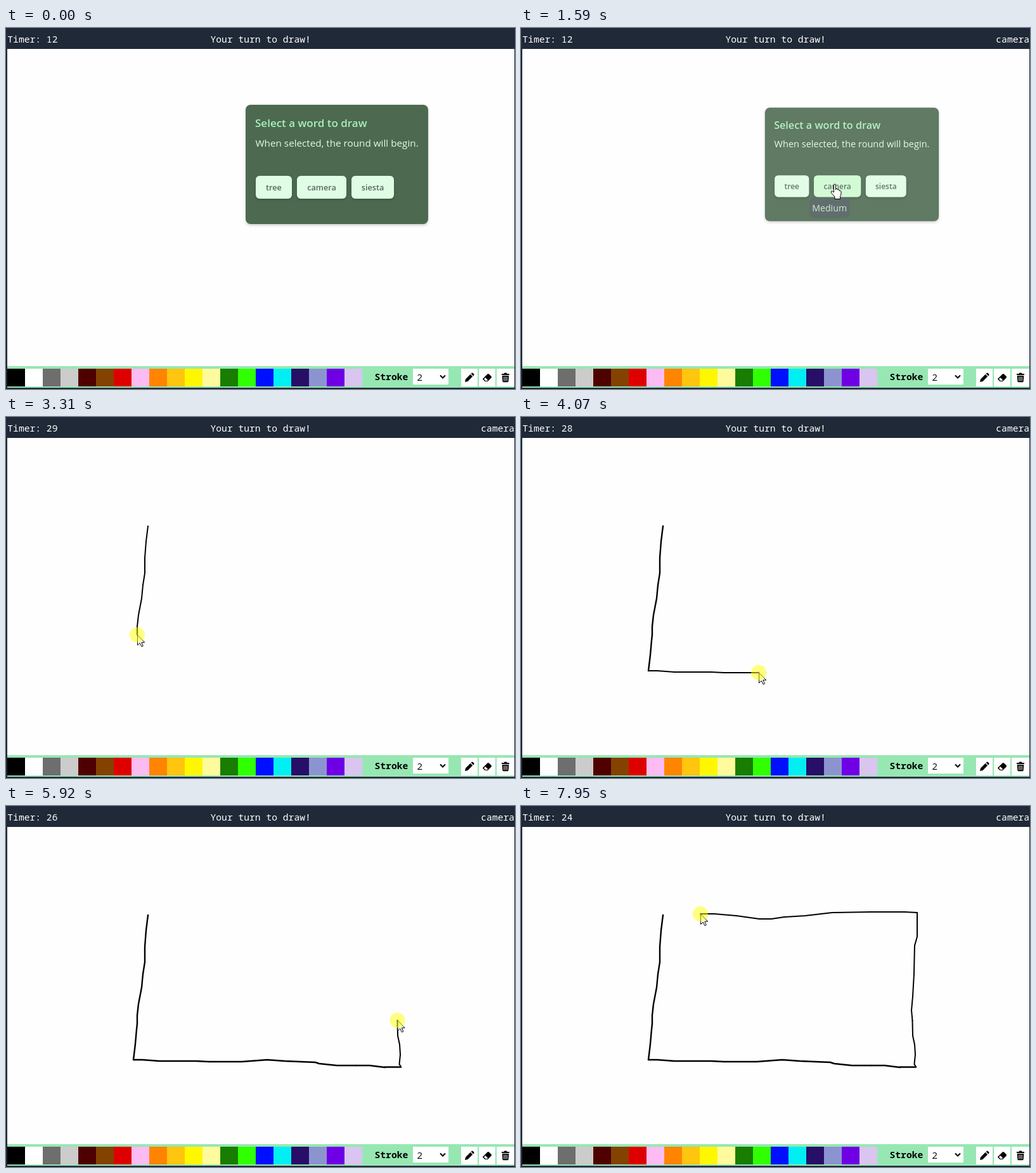
These frames come from a looping animation (803 px wide and 569 px high, 8000 ms). An HTML page:

```html
<!DOCTYPE html>
<html lang="en">
<head>
<meta charset="utf-8">
<title>Drawing game</title>
<style>
  html, body { margin: 0; width: 100%; height: 100%; overflow: hidden; background: #1f2937; }
  svg { display: block; }
  text { white-space: pre; font-family: "Open Sans", "Noto Sans", sans-serif; }
  .mono { font: 14.67px "Noto Sans Mono", "DejaVu Sans Mono", monospace; fill: #fff; }
  .shadow { filter: drop-shadow(0 2px 2px #0003); }
  .button rect { fill: #dffde5; }
  .button text { font-size: 12.7px; font-weight: 600; fill: #56685a; }
  .button.hover rect { fill: #cdfbd0; }
  .pen { fill: none; stroke: #000; stroke-linejoin: round; stroke-linecap: round; }
  .cursor { fill: #fff; stroke: #000; }
</style>
</head>
<body>
<svg width="803" height="569" viewBox="0 0 803 569">
  <rect width="803" height="569" fill="#1f2937"/>
  <rect x="2" y="33" width="800" height="500" fill="#fefefe"/>
  <text class="mono" id="timer" x="2.3" y="23"></text>
  <text class="mono" x="322.5" y="23">Your turn to draw!</text>
  <text class="mono" id="word" x="749.3" y="23">camera</text>

  <rect x="2" y="533" width="800" height="34" fill="#97e7b3"/>
  <g id="palette"></g>
  <text class="mono" x="581.5" y="555" style="font-weight:700;fill:#000">Stroke</text>
  <rect x="642" y="537" width="56" height="25" fill="#fff"/>
  <text x="648.5" y="556" font-size="15">2</text>
  <path d="M685 547.5l4 4 4-4" fill="none" stroke="#000" stroke-width="2"/>
  <path d="M718 537h26v28h-26zM746 537h26v28h-26zM774 537h28v28h-28z" fill="#fff"/>
  <path d="M724 558l1-4.500 7.700-7.700 3.500 3.500-7.700 7.700zM733.700 544.800l1-1q1-.7 2 .2l1.500 1.500q.8 1 0 2l-1 1z"/>
  <path d="M752.500 552.500l7-7q1.200-1 2.400 0l3.600 3.600q1 1.200 0 2.400l-5.500 5.500h-4.500l-3-3q-.8-.8 0-1.500z"/>
  <path d="M754 553.300l2.200-2.200 4 4-1 1h-3z" fill="#fff"/>
  <path d="M782 545h3.500l1-1.500h3l1 1.500h3.500v2h-12zM782.800 548h10.400l-.6 9q-.1 1.200-1.300 1.200h-6.600q-1.200 0-1.300-1.200z"/>
  <path d="M785.700 549.500v7M788 549.500v7M790.300 549.500v7" stroke="#fff" stroke-width=".9"/>

  <g id="dialog">
    <rect class="shadow" x="378" y="121" width="288" height="188" rx="8" fill="#4d6a50"/>
    <text x="393" y="156" font-size="17" font-weight="600" fill="#a9f0bd">Select a word to draw</text>
    <text x="393.500" y="187" font-size="15.250" fill="#dffde5">When selected, the round will begin.</text>
    <g id="buttons"></g>
    <g id="tooltip">
      <rect x="452" y="270.500" width="66" height="33.500" rx="6" fill="#4d5e5c"/>
      <text x="456" y="293" font-size="14.900" fill="#cfe8d6">Medium</text>
    </g>
  </g>

  <g id="drawing"></g>
  <g id="pointer">
    <path class="cursor" id="arrow" d="M.5 .5V16.500L4.300 13 7 18.700 9.300 17.600 6.800 12H11.700Z"/>
    <path class="cursor" id="hand" d="M-1.500 2q0-2 1.500-2t1.500 2v7V7.500q1.500-1 3 .5v1q1.500-1 3 .5v1.200q2-.8 2.500 1V15q0 2-1.500 4.500v4H0V20L-5 14.500q-1.500-2-.5-3.200 1.500-1 3 .8l1 1z"/>
    <circle id="press" r="12" fill="#ff0" fill-opacity=".5"/>
  </g>
</svg>
<script>
const $ = id => document.getElementById(id);
const svgNode = (name, attrs, parent) => {
  const node = document.createElementNS("http://www.w3.org/2000/svg", name);
  for (const key in attrs) node.setAttribute(key, attrs[key]);
  return parent.appendChild(node);
};
const show = (node, on) => { node.style.display = on ? "" : "none"; };
const clamp = v => Math.min(1, Math.max(0, v));

const LOOP = 8000, HOVER = 900, PICK = 1560, CLOSED = 1700, ROUND = 1650;

"000 fff 6e6e6e ccc 4f0000 844200 de0000 fcbbf3 ff8400 ffc50f fff700 fffb9c 187d00 30ff00 000fff 00eff3 270f68 8c94cf 6f00e6 d9c5ef"
  .split(" ").forEach((color, i) =>
    svgNode("rect", { x: 2 + 28 * i, y: 537, width: 28, height: 28, fill: "#" + color }, $("palette")));

const buttons = [["tree", 394, 57], ["camera", 459, 78], ["siesta", 545, 67]].map(([label, x, width]) => {
  const group = svgNode("g", { class: "button" }, $("buttons"));
  svgNode("rect", { class: "shadow", x, y: 233, width, height: 36, rx: 6 }, group);
  svgNode("text", { x: x + width / 2, y: 256, "text-anchor": "middle" }, group).textContent = label;
  return group;
});

// Pointer travel: start, end, path; a fourth value marks ink and when it settles.
const legs = [
  [70, 630, "M723 502L468 255"],
  [900, 1480, "M468 255L495 246"],
  [1680, 1940, "M495 246Q370 284 295 258"],
  [1940, 2420, "M295 258Q240 205 224 171"],
  [2510, 3310, "M224 172L221 196 219 222 219 246 216 265 214 286 209 312 207 330 207 343", 3720],
  [3310, 3520, "M207 343L206 352 204 375 201 400", 3720],
  [3660, 4490, "M201 400H215L242 402H300L320 403H372L412 400 440 402 488 404 494 406 522 409H552", 5310],
  [4490, 4770, "M552 409H574L598 412", 5310],
  [4770, 5090, "M598 411.500H623", 5310],
  [5720, 5920, "M623 411L620.500 407 621 402 622 392 621 376 618 362 617.500 338", LOOP],
  [5920, 6550, "M617.500 338L616 322 618 300 620 265 621 220", LOOP],
  [6550, 6900, "M621 220L625 206V168", LOOP],
  [6920, 7390, "M625 168L605 167H552L491 168", LOOP],
  [7390, 7950, "M491 168L448 173 415 175 395 178H376L340 173 305 170H283", LOOP]
].map(([start, end, d, settle]) => {
  const path = svgNode("path", { d, class: "pen" }, $("drawing"));
  return { start, end, settle, path, length: path.getTotalLength() };
});

const presses = [[1480, PICK], [2480, 5310], [5580, LOOP]];

function drawPointer(t) {
  let point;
  for (const { start, end, settle, path, length } of legs) {
    const p = clamp((t - start) / (end - start));
    const travel = length * (settle ? p : Math.sin(p * Math.PI / 2));
    if (t >= start) point = path.getPointAtLength(travel);
    show(path, settle && p > 0);
    path.style.strokeDasharray = `${travel} ${length + 9}`;
    path.style.strokeWidth = t < settle ? 2 : 2.4;
  }
  show($("pointer"), point);
  if (point) $("pointer").setAttribute("transform", `translate(${point.x} ${point.y})`);
  const onButton = t >= HOVER && t < CLOSED;
  show($("hand"), onButton);
  show($("arrow"), !onButton);
  show($("press"), presses.some(([from, to]) => t >= from && t < to));
}

function drawDialog(t) {
  const fade = Math.max(0, t - PICK - 8);
  const scale = 1 - fade * 0.00207;
  show($("dialog"), t < CLOSED);
  $("dialog").setAttribute("transform", `translate(522 215) scale(${scale}) translate(-522 -215)`);
  $("dialog").style.opacity = 1 - fade * 0.0047;
  show($("tooltip"), t >= HOVER);
  buttons[1].classList.toggle("hover", t >= HOVER);
}

function frame(now) {
  const t = now % LOOP;
  $("timer").textContent = "Timer: " + (t < ROUND ? 12 : 30 - Math.floor((t - ROUND) / 1000));
  show($("word"), t >= PICK);
  drawDialog(t);
  drawPointer(t);
  requestAnimationFrame(frame);
}
frame(0);
</script>
</body>
</html>
```
